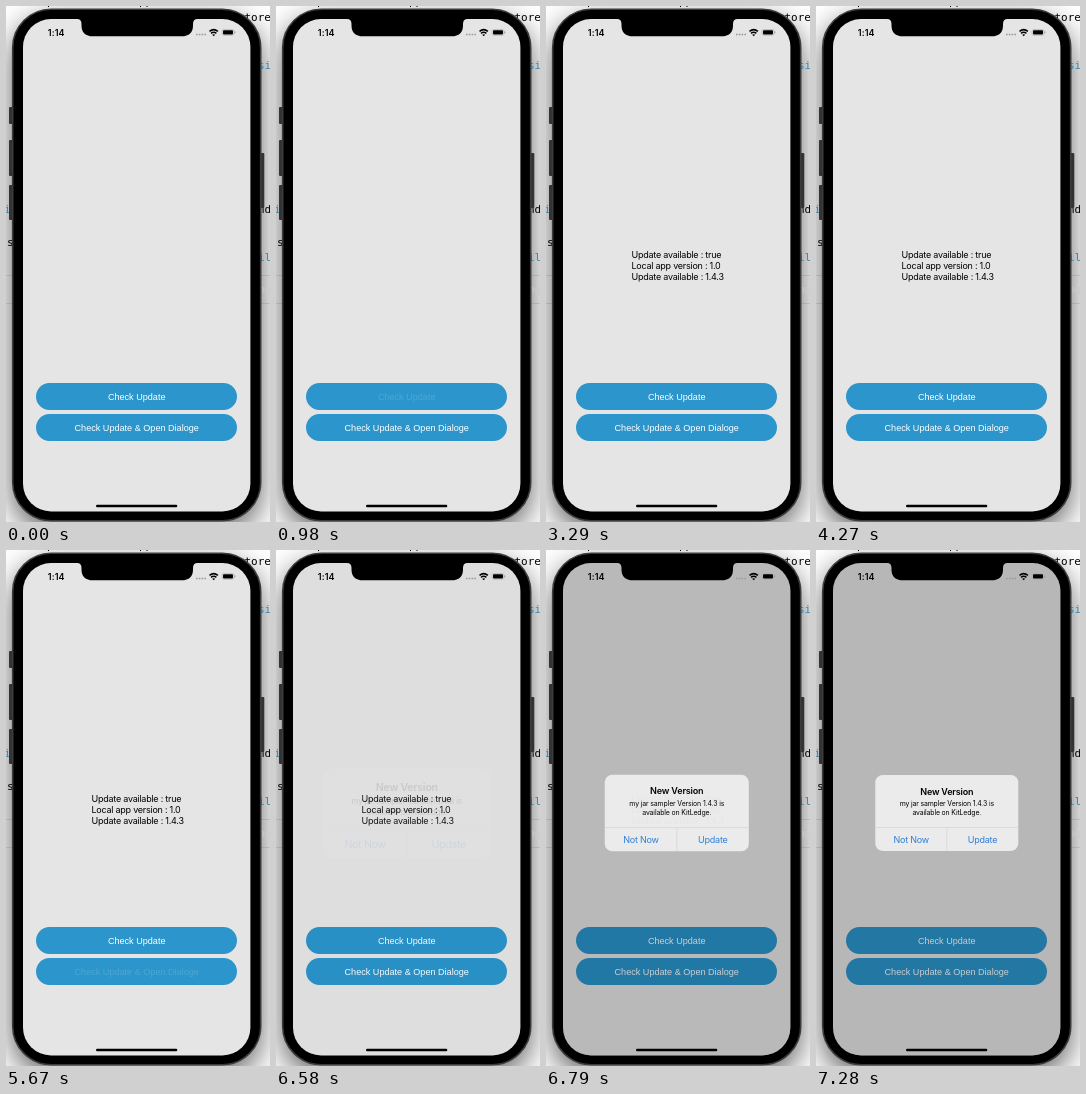
An HTML page for the animation above (8 s loop, 264 px wide and 516 px high).

```html
<!DOCTYPE html>
<html lang="en">
<head>
<meta charset="utf-8">
<title>Update check</title>
<style>
  @property --p { syntax: "<number>"; inherits: true; initial-value: 0; }

  html, body { margin: 0; width: 100%; height: 100%; overflow: hidden; background: #fff; }
  svg { display: block; width: 264px; height: 516px; }
  text { white-space: pre; }

  .code { font: 11px "DejaVu Sans Mono", monospace; }
  .blue { fill: #3a86ad; }
  .hint { fill: #ccc; }
  .shadow { filter: blur(15px); opacity: .62; }
  .ui { font: 9px Inter, sans-serif; letter-spacing: -.027em; }
  .bold { font-weight: 600; letter-spacing: -.02em; }
  .clock { letter-spacing: .01em; }
  .mid { text-anchor: middle; }
  .button rect { fill: #2b95cc; }
  .button text { font: 9.1px "Liberation Sans", Arial, sans-serif; fill: #fff; text-anchor: middle; }

  .first, .second, .result, .alert { animation: 8s step-end infinite; }
  .first { animation-name: press-first; }
  .second { animation-name: press-second; }
  .result { animation-name: show; }
  .alert { animation-name: present; }

  /* --p is the progress of the alert's spring */
  .dim { opacity: calc(var(--p) * .2); }
  .dialog {
    opacity: calc(1.08 * var(--p) - .06);
    transform: scale(calc(1.2 - .2 * var(--p)));
    transform-origin: 130.8px 263px;
  }
  .message { font-size: 6.9px; letter-spacing: -.02em; }
  .action { fill: #2f7fd6; }

  @keyframes press-first {
    0% { opacity: 1; }
    12.25% { opacity: .16; }
    14.875% { opacity: .42; }
    15.75% { opacity: .68; }
    16.625% { opacity: .9; }
    17.5%, 100% { opacity: 1; }
  }
  @keyframes press-second {
    0% { opacity: 1; }
    70% { opacity: .16; }
    74.375% { opacity: .34; }
    75.25% { opacity: .57; }
    76.125% { opacity: .78; }
    77% { opacity: .93; }
    77.875%, 100% { opacity: 1; }
  }
  @keyframes show {
    0% { opacity: 0; }
    26.25%, 100% { opacity: 1; }
  }
  @keyframes present {
    0% { --p: 0; }
    82.25% { --p: .14; }
    83.125% { --p: .63; }
    84% { --p: .874; }
    84.875% { --p: .962; }
    85.75% { --p: .989; }
    86.625% { --p: .997; }
    87.5%, 100% { --p: 1; }
  }
</style>
</head>
<body>
<svg viewBox="0 0 264 516">
  <defs>
    <clipPath id="screen"><rect x="17" y="13" width="227.400" height="492.500" rx="28"/></clipPath>
  </defs>

  <!-- editor window behind the phone -->
  <rect width="264" height="516" fill="#fff"/>
  <path d="M0 269.500H264M0 297.500H264" stroke="#e6e6e6"/>
  <rect class="shadow" x="6" y="14" width="249" height="512" rx="39"/>
  <g class="code">
    <text x="41" y="-1">p</text>
    <text x="133" y="-1">pp</text>
    <text x="238.500" y="15">tore</text>
    <text x="252" y="63" class="blue">si</text>
    <text x="252" y="207">nd</text>
    <text x="252" y="255" class="blue">il</text>
    <text x="252" y="287" class="hint">ng</text>
    <text x="-2" y="207" class="blue">i</text>
    <text x="1" y="239.500">s</text>
  </g>

  <!-- phone body -->
  <g fill="#333">
    <rect x="3" y="101" width="4" height="17" rx="1"/>
    <rect x="3" y="134" width="4" height="36" rx="1"/>
    <rect x="3" y="179" width="4" height="35" rx="1"/>
    <rect x="254" y="147" width="4.300" height="55" rx="1"/>
  </g>
  <rect x="6.700" y="3.200" width="248" height="511.500" rx="38.500" stroke="#3c3c3c" stroke-width="1.600"/>

  <g clip-path="url(#screen)">
    <rect x="17" y="13" width="228" height="493" fill="#e5e5e5"/>

    <g class="ui result">
      <text x="85.500" y="252.300">Update available : true</text>
      <text x="85.500" y="263">Local app version : 1.0</text>
      <text x="85.500" y="273.600">Update available : 1.4.3</text>
    </g>

    <g class="button">
      <rect x="30" y="377" width="201" height="27" rx="13.500"/>
      <text class="first" x="130.700" y="394">Check Update</text>
      <rect x="30" y="408" width="201" height="27" rx="13.500"/>
      <text class="second" x="130.700" y="425">Check Update &amp; Open Dialoge</text>
    </g>

    <g class="alert">
      <rect class="dim" x="17" y="13" width="228" height="493"/>
      <g class="dialog ui">
        <rect x="59.300" y="225" width="143" height="76" rx="7.400" fill="#ebebeb"/>
        <path d="M59.300 277.500H202.300M130.800 277.500V301" stroke="#d0d0d0" stroke-width=".6"/>
        <g class="mid">
          <text class="bold" x="130.800" y="244.500">New Version</text>
          <text class="message" x="130.800" y="255.700">my jar sampler Version 1.4.3 is</text>
          <text class="message" x="130.800" y="264.500">available on KitLedge.</text>
          <text class="action" x="95.200" y="292.700">Not Now</text>
          <text class="action" x="166.500" y="292.700">Update</text>
        </g>
      </g>
    </g>

    <!-- status bar and home indicator -->
    <path d="M71 12V13Q75.500 13 75.500 18V19.500Q75.500 30.300 87 30.300H175.500Q187 30.300 187 19.500V18Q187 13 191.500 13V12Z"/>
    <text class="ui bold clock" x="41.800" y="30">1:14</text>
    <path d="M190 28.500H200" stroke="#999" stroke-width="1.600" stroke-dasharray="1.600 1.200"/>
    <g fill="none" stroke="#000" stroke-width="1.500">
      <path d="M203.500 25.400Q207.700 21.800 211.900 25.400"/>
      <path d="M205 27.400Q207.700 25.200 210.400 27.400"/>
    </g>
    <path d="M206.200 28.700Q207.700 27.600 209.200 28.700L207.700 30.300Z"/>
    <rect x="216" y="23.500" width="12" height="5.800" rx="1.700" fill="none" stroke="#aaa" stroke-width=".6"/>
    <rect x="217" y="24.300" width="10" height="4.200" rx="1"/>
    <path d="M228.800 25.400V27.400" stroke="#999"/>
    <rect x="90" y="498.700" width="81.300" height="2.500" rx="1.250"/>
  </g>
</svg>
</body>
</html>
```
